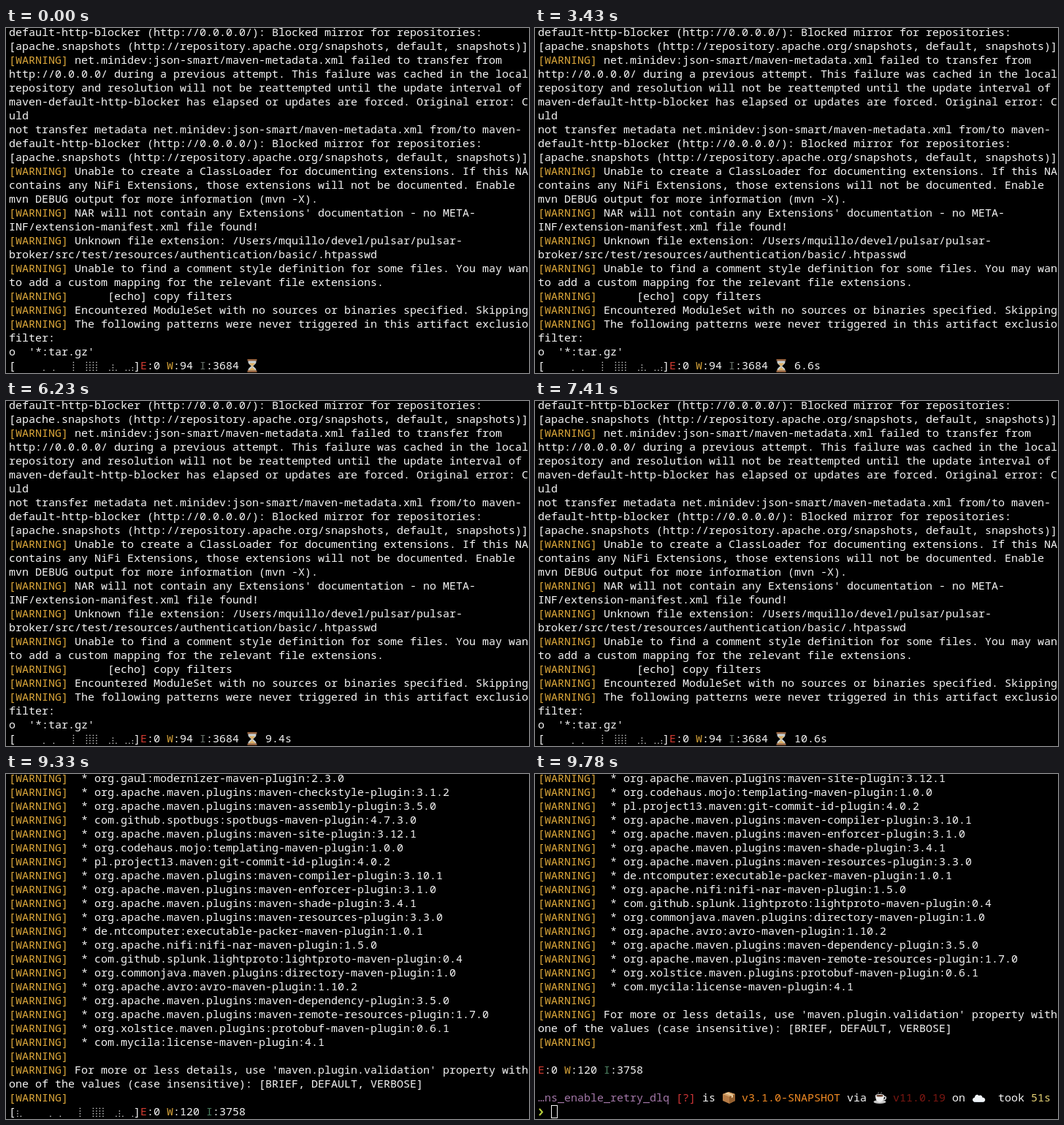
Write an HTML page that moves like this. It is 716 px wide and 472 px high and loops after 9.8 s.

```html
<!DOCTYPE html>
<html lang="en">
<head>
<meta charset="utf-8">
<title>Build log</title>
<style>
  html, body { margin: 0; width: 100%; height: 100%; overflow: hidden; background: #000; }
  svg { display: block; width: 716px; height: 472px; }
  text {
    font: 15px "Noto Sans Mono", "DejaVu Sans Mono", monospace;
    font-variant-ligatures: none;
    white-space: pre;
    fill: #f4f4f4;
  }
</style>
</head>
<body>
<svg viewBox="0 0 716 472">
  <defs>
    <g id="hourglass">
      <path d="M3.5 3h11v2c0 3-4 4.500-4 5.500s4 2.500 4 5.500v2h-11v-2c0-3 4-4.500 4-5.500s-4-2.500-4-5.500z" fill="#c9d2d6"/>
      <path d="M5 6.500h8c-.7 2-3 3-4 4-1-1-3.300-2-4-4zM4.500 16.500c.5-2 3-3 4.500-3.500 1.500.5 4 1.500 4.500 3.500z" fill="#dcae62"/>
      <path d="M9 10v5" stroke="#dcae62"/>
      <path d="M2.500 1h13v2.500h-13zM2.500 16.500h13v2.500h-13z" fill="#94603c"/>
    </g>
    <g id="parcel">
      <path d="M1 5l8-3 9 3v9l-8 4-9-4z" fill="#b67c46"/>
      <path d="M1 5l8-3 9 3-8 3.500z" fill="#d8a66d"/>
      <path d="M10 8.500l8-3.500v9l-8 4z" fill="#95602f"/>
      <path d="M4.500 3.700l8.500 3.500v3l2-1v-3l-8-3.500z" fill="#ead0a4"/>
    </g>
    <g id="cup">
      <ellipse cx="9" cy="15.500" rx="8.500" ry="2.500" fill="#c8c8c8"/>
      <path d="M3 7h12c0 5-2 9-6 9s-6-4-6-9z" fill="#ececec"/>
      <path d="M14.500 8.500c4-1 4 4-1 4.500" fill="none" stroke="#dedede" stroke-width="1.500"/>
      <ellipse cx="9" cy="7" rx="6" ry="2" fill="#fafafa"/>
      <ellipse cx="9" cy="7.200" rx="4.800" ry="1.300" fill="#5c3420"/>
      <path d="M7 5c-1-1 1-2 0-3M11 5c-1-1 1-2 0-3" fill="none" stroke="#999" stroke-width=".8"/>
    </g>
    <g id="cloud">
      <path d="M5 16c-5 0-5-6-1-6.500 0-4 4-5 5.500-2.500 3-1.500 5 .5 5 2.500 5 0 5 6.500 0 6.500z" fill="#f1f4f7"/>
      <path d="M3 14.500c4 1 9 1 13 0-.5 1-1 1.500-2 1.500h-9c-1 0-1.600-.5-2-1.500z" fill="#cbd5de"/>
    </g>
  </defs>
</svg>
<script>
const NS = 'http://www.w3.org/2000/svg';
const LOOP = 9800, LAST_ROW = 24;
const GOLD = '#dca73a', RED = '#d03a30', GREEN = '#4b7f60', DIM = '#66706a';
const svg = document.querySelector('svg');

const colX = col => 4 + 9 * col;
const rowY = row => 11 + 19 * row;

function add(parent, tag, attrs = {}, text = '') {
  const el = document.createElementNS(NS, tag);
  for (const key in attrs) el.setAttribute(key, attrs[key]);
  el.textContent = text;
  parent.append(el);
  return el;
}

function write(g, col, row, text, color) {
  const el = add(g, 'text', { x: colX(col), y: rowY(row) }, text);
  if (color) el.style.fill = color;
  return el;
}

function icon(g, name, col, row) {
  add(g, 'use', { href: '#' + name, x: colX(col), y: rowY(row) - 15 });
}

function writeLines(g, lines) {
  const tag = '[WARNING]';
  lines.forEach((line, row) => {
    if (line.startsWith(tag)) {
      write(g, 0, row, tag, GOLD);
      write(g, 9, row, line.slice(9));
    } else write(g, 0, row, line);
  });
}

function counts(g, col, row, warnings, infos, infoColor) {
  for (const [name, value, color] of [['E', 0, RED], ['W', warnings, GOLD], ['I', infos, infoColor]]) {
    write(g, col, row, name, color);
    const rest = ':' + value;
    write(g, col + 1, row, rest);
    col += rest.length + 2;
  }
}

// Activity history: column -> height in dots; new columns enter on the left.
const history = { '-2': 3, '-1': 1, 8: 1, 11: 1, 17: 4, 21: 4, 22: 4, 23: 4, 24: 4,
  28: 1, 29: 3, 30: 1, 33: 1, 34: 1, 35: 2 };

function status(g, shift, warnings, infos, infoColor) {
  write(g, 0, LAST_ROW, '[');
  write(g, 19, LAST_ROW, ']');
  for (const key in history) {
    const col = +key + shift;
    if (col < 0 || col > 35) continue;
    for (let i = 0; i < history[key]; i++)
      add(g, 'rect', { x: 15.2 + 4.5 * col, y: 467.6 - 3.6 * i, width: 1.4, height: 1.4, fill: '#d0d0d0' });
  }
  counts(g, 20, LAST_ROW, warnings, infos, infoColor);
}

function cursor(g, col) {
  add(g, 'rect', { x: colX(col) + .5, y: 453.5, width: 8, height: 17, fill: 'none', stroke: '#f4f4f4' });
}

const mirror = [
  'default-http-blocker (http://0.0.0.0/): Blocked mirror for repositories:',
  '[apache.snapshots (http://repository.apache.org/snapshots, default, snapshots)]'
];
const buildLog = [
  ...mirror,
  '[WARNING] net.minidev:json-smart/maven-metadata.xml failed to transfer from',
  'http://0.0.0.0/ during a previous attempt. This failure was cached in the local',
  'repository and resolution will not be reattempted until the update interval of',
  'maven-default-http-blocker has elapsed or updates are forced. Original error: C',
  'uld',
  'not transfer metadata net.minidev:json-smart/maven-metadata.xml from/to maven-',
  ...mirror,
  '[WARNING] Unable to create a ClassLoader for documenting extensions. If this NA',
  'contains any NiFi Extensions, those extensions will not be documented. Enable',
  'mvn DEBUG output for more information (mvn -X).',
  "[WARNING] NAR will not contain any Extensions' documentation - no META-",
  'INF/extension-manifest.xml file found!',
  '[WARNING] Unknown file extension: /Users/mquillo/devel/pulsar/pulsar-',
  'broker/src/test/resources/authentication/basic/.htpasswd',
  '[WARNING] Unable to find a comment style definition for some files. You may wan',
  'to add a custom mapping for the relevant file extensions.',
  '[WARNING]      [echo] copy filters',
  '[WARNING] Encountered ModuleSet with no sources or binaries specified. Skipping',
  '[WARNING] The following patterns were never triggered in this artifact exclusio',
  'filter:',
  "o  '*:tar.gz'"
];

const apache = name => 'org.apache.maven.plugins:maven-' + name;
const plugins = [
  'org.gaul:modernizer-maven-plugin:2.3.0',
  apache('checkstyle-plugin:3.1.2'),
  apache('assembly-plugin:3.5.0'),
  'com.github.spotbugs:spotbugs-maven-plugin:4.7.3.0',
  apache('site-plugin:3.12.1'),
  'org.codehaus.mojo:templating-maven-plugin:1.0.0',
  'pl.project13.maven:git-commit-id-plugin:4.0.2',
  apache('compiler-plugin:3.10.1'),
  apache('enforcer-plugin:3.1.0'),
  apache('shade-plugin:3.4.1'),
  apache('resources-plugin:3.3.0'),
  'de.ntcomputer:executable-packer-maven-plugin:1.0.1',
  'org.apache.nifi:nifi-nar-maven-plugin:1.5.0',
  'com.github.splunk.lightproto:lightproto-maven-plugin:0.4',
  'org.commonjava.maven.plugins:directory-maven-plugin:1.0',
  'org.apache.avro:avro-maven-plugin:1.10.2',
  apache('dependency-plugin:3.5.0'),
  apache('remote-resources-plugin:1.7.0'),
  'org.xolstice.maven.plugins:protobuf-maven-plugin:0.6.1',
  'com.mycila:license-maven-plugin:4.1'
];
const pluginLog = [
  ...plugins.map(p => '[WARNING]  * ' + p),
  '[WARNING]',
  "[WARNING] For more or less details, use 'maven.plugin.validation' property with",
  'one of the values (case insensitive): [BRIEF, DEFAULT, VERBOSE]',
  '[WARNING]'
];

const screens = [];
function screen(start, draw) {
  const g = add(svg, 'g');
  draw(g);
  screens.push({ start, g });
}

let timer;
screen(0, g => {
  writeLines(g, buildLog);
  status(g, 0, 94, 3684, DIM);
  icon(g, 'hourglass', 36, LAST_ROW);
  timer = write(g, 39, LAST_ROW, '');
});
screen(9040, g => {
  writeLines(g, buildLog);
  status(g, 1, 94, 3691, DIM);
});
screen(9330, g => {
  writeLines(g, pluginLog);
  status(g, 2, 120, 3758, GREEN);
});
screen(9480, g => {
  writeLines(g, pluginLog.slice(2));
  counts(g, 0, 23, 120, 3758, GREEN);
  cursor(g, 0);
});
screen(9780, g => {
  writeLines(g, pluginLog.slice(4));
  counts(g, 0, 21, 120, 3758, GREEN);
  const prompt = [
    [0, '…ns_enable_retry_dlq', '#a377a8'], [21, '[?]', '#d03638'], [25, 'is'],
    [31, 'v3.1.0-SNAPSHOT', '#f08a24'], [47, 'via'], [54, 'v11.0.19', '#7c1712'],
    [63, 'on'], [70, 'took'], [75, '51s', '#e6d274']
  ];
  for (const [col, text, color] of prompt) write(g, col, 23, text, color);
  icon(g, 'parcel', 28, 23);
  icon(g, 'cup', 51, 23);
  icon(g, 'cloud', 66, 23);
  add(g, 'path', { d: 'M6 458l4 4.500-4 4.500', fill: 'none', stroke: '#b9d03c', 'stroke-width': 2 });
  cursor(g, 2);
});

// The elapsed time refreshes in bursts of eight ticks.
const bursts = [1950, 3130, 4310, 5490, 6680, 7860];
const offsets = [0, 150, 300, 440, 590, 730, 880, 1030];
const ticks = bursts.flatMap(b => offsets.map(o => b + o));

function frame(now) {
  const t = now % LOOP;
  const current = screens.findLast(s => t >= s.start);
  for (const s of screens) s.g.style.display = s === current ? '' : 'none';
  const tick = ticks.findLast(x => t >= x);
  const label = tick ? ((tick + 3170) / 1000).toFixed(1) + 's' : '';
  if (timer.textContent !== label) timer.textContent = label;
}

const begin = performance.now();
function loop() {
  frame(performance.now() - begin);
  requestAnimationFrame(loop);
}
loop();
</script>
</body>
</html>
```
